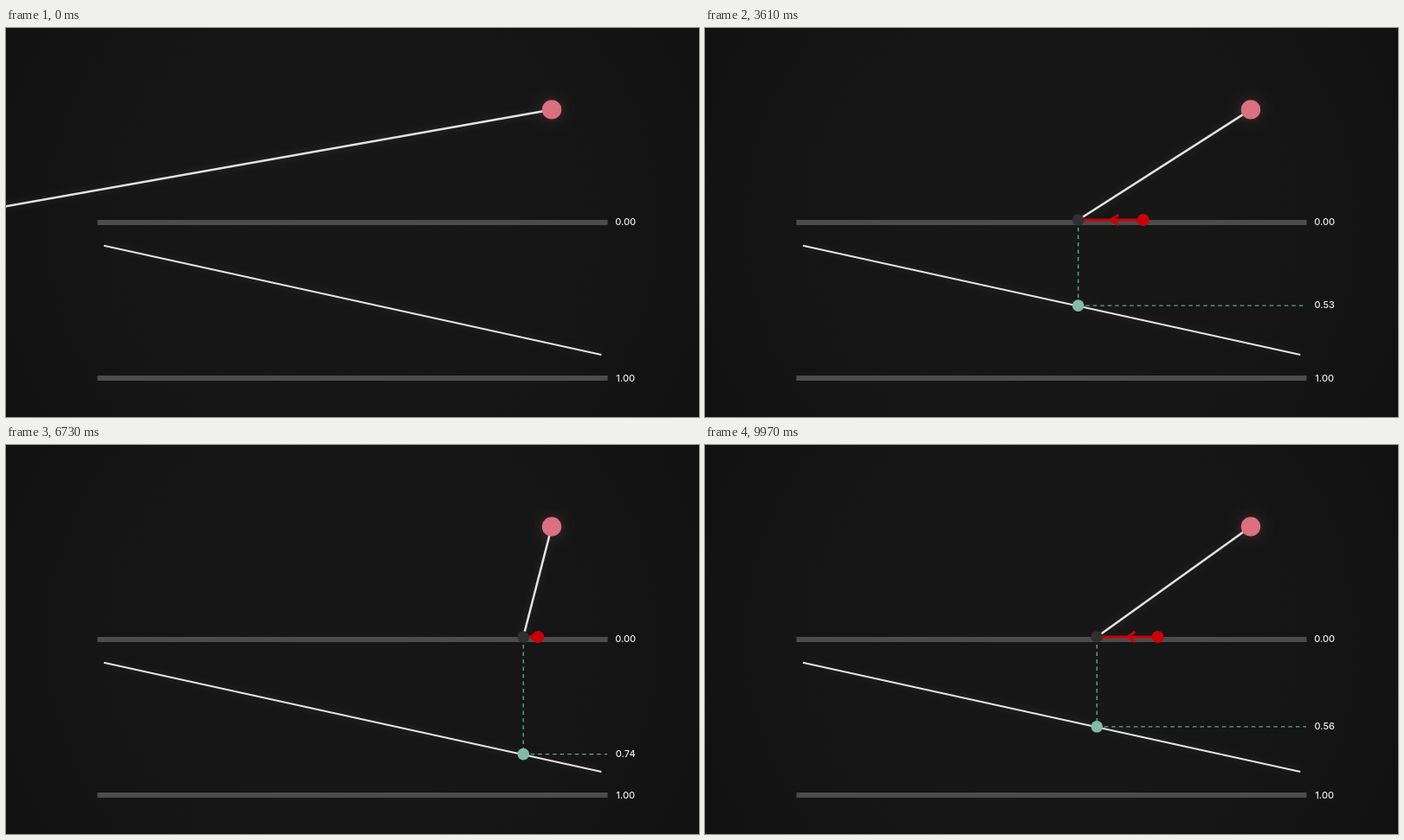
An HTML page with a canvas that plays this animation: 800x450 px, repeating every 10 s.

```html
<!DOCTYPE html>
<html lang="en">
<head>
<meta charset="utf-8">
<title>Ray and curve</title>
<style>
html, body { margin: 0; width: 100%; height: 100%; overflow: hidden; background: #131313; }
canvas { display: block; width: 800px; height: 450px; }
</style>
</head>
<body>
<canvas id="stage" width="800" height="450"></canvas>
<script>
const ctx = document.getElementById('stage').getContext('2d');
const LOOP = 10000;
const TAU = Math.PI * 2;
const lamp = { x: 630, y: 94.4 };
const floorY = 222;
const bar = { left: 105.5, right: 694.5 };

// Where the ray meets the floor over time: [ms, x]
const path = [
  [0, -90], [1030, 575], [1970, 629.9], [2060, 629.9], [3090, 533],
  [3610, 431], [4120, 347], [5120, 119], [5260, 119], [5790, 334.3],
  [6270, 500], [6730, 597], [7300, 692], [7330, 695.5], [7450, 697.4],
  [7830, 697.4], [8090, 726], [8390, 699], [8560, 699], [9580, 549],
  [9970, 452.4], [10000, 452.4]
];

const slope = i => (path[i + 1][1] - path[i][1]) / (path[i + 1][0] - path[i][0]);

// Tangents that never overshoot the points
const tangents = path.map((p, i) => {
  if (i === 0) return slope(0);
  if (i === path.length - 1) return 0;
  const a = slope(i - 1), b = slope(i);
  return a * b <= 0 ? 0 : 2 * a * b / (a + b);
});

function hitAt(t) {
  let i = 0;
  while (i < path.length - 2 && t >= path[i + 1][0]) i++;
  const [t0, x0] = path[i], [t1, x1] = path[i + 1];
  const h = t1 - t0, s = (t - t0) / h, r = 1 - s;
  return x0 * (1 + 2 * s) * r * r + tangents[i] * h * s * r * r +
         x1 * s * s * (3 - 2 * s) - tangents[i + 1] * h * s * s * r;
}

const curveY = x => 364.8 + (x - lamp.x) * 0.2195;
const valueAt = x => 0.7355 + (x - 597) * 0.00122;

function line(points, color, width, dash = []) {
  ctx.strokeStyle = color;
  ctx.lineWidth = width;
  ctx.setLineDash(dash);
  ctx.beginPath();
  points.forEach(([x, y]) => ctx.lineTo(x, y));
  ctx.stroke();
}

function dot(x, y, r, color) {
  ctx.fillStyle = color;
  ctx.beginPath();
  ctx.arc(x, y, r, 0, TAU);
  ctx.fill();
}

function glow(color, blur, draw) {
  ctx.save();
  ctx.shadowColor = color;
  ctx.shadowBlur = blur;
  draw();
  ctx.restore();
}

function label(value, y) {
  ctx.fillStyle = '#ececec';
  ctx.fillText(value.toFixed(2), 715.2, y);
}

const backdrop = ctx.createRadialGradient(400, 225, 60, 400, 225, 460);
backdrop.addColorStop(0, '#171717');
backdrop.addColorStop(0.6, '#151515');
backdrop.addColorStop(1, '#111111');

function drawScene() {
  ctx.fillStyle = backdrop;
  ctx.fillRect(0, 0, 800, 450);
  ctx.fillStyle = '#4c4c4c';
  for (const y of [222, 402]) ctx.fillRect(bar.left, y, bar.right - bar.left, 6);
  label(0, 228);
  label(1, 408.5);
  glow('rgba(255,255,255,0.15)', 12, () =>
    line([[113, 251.7], [687.3, 378]], '#e4e4e4', 2));
}

function drawRay(x, hits) {
  const reach = hits ? 1 : 40;
  const end = [lamp.x + (x - lamp.x) * reach, lamp.y + (floorY - lamp.y) * reach];
  glow('rgba(255,255,255,0.15)', 12, () =>
    line([[lamp.x, lamp.y], end], '#e4e4e4', 2.5));
}

function drawProbe(x) {
  const y = curveY(x), v = valueAt(x);
  const dash = [4.5, 4];
  line([[x, 231], [x, y]], '#64a38f', 1.4, dash);
  line([[x, y], [694, y]], '#64a38f', 1.2, dash);
  dot(x, y, 6.8, '#84baa9');
  label(v, y + 3);
}

function drawArrow(x) {
  const red = '#cc0008';
  const start = x + (lamp.x - x) * valueAt(x) * 0.708;
  const tip = (x + start) / 2;
  const back = start >= x ? 9 : -9;
  line([[start, floorY], [x, floorY]], red, 2.8);
  dot(x, floorY, 6.8, '#303030');
  line([[tip + back, floorY - 6], [tip, floorY], [tip + back, floorY + 6]], red, 2.8);
  dot(start, floorY, 7, red);
}

function render(t) {
  const x = hitAt(t);
  const hits = x >= bar.left && x <= bar.right;
  ctx.font = '500 11px Inter, Lato, sans-serif';
  ctx.textAlign = 'center';
  drawScene();
  drawRay(x, hits);
  if (hits) {
    drawProbe(x);
    drawArrow(x);
  }
  glow('rgba(218,112,127,0.25)', 14, () => dot(lamp.x, lamp.y, 11.2, '#da7080'));
}

const begin = performance.now();
function tick() {
  render((performance.now() - begin) % LOOP);
  requestAnimationFrame(tick);
}
tick();
</script>
</body>
</html>
```
